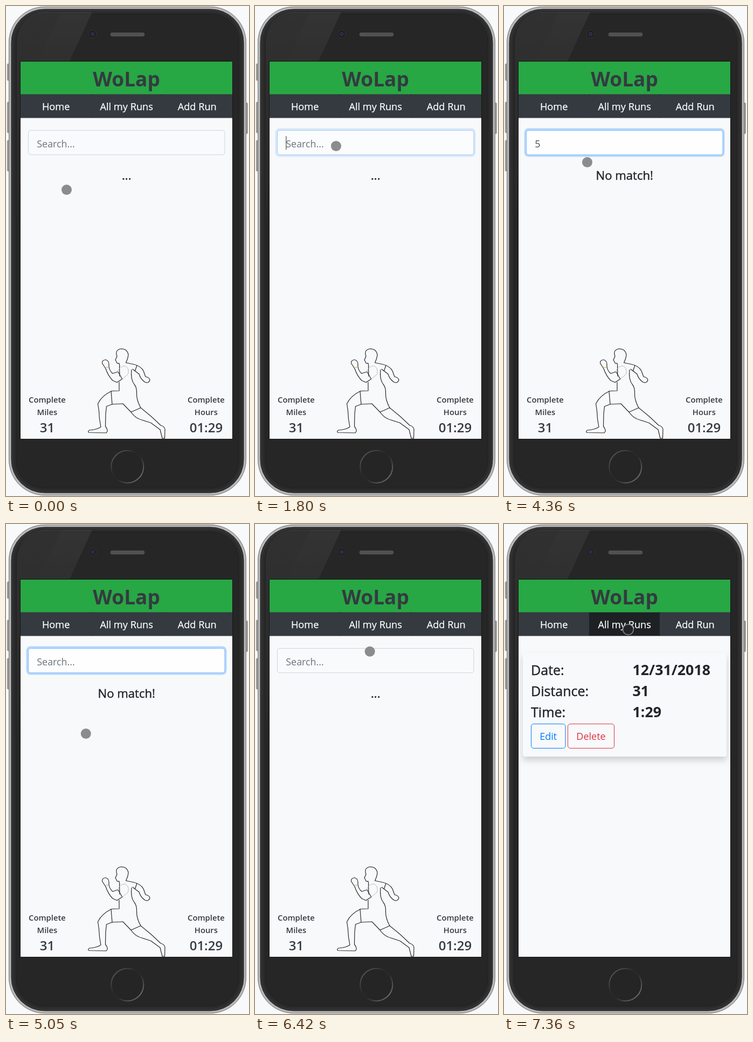
Write an HTML page that moves like this. It is 451 px wide and 908 px high and loops after 8 s.

```html
<!DOCTYPE html>
<html lang="en">
<head>
<meta charset="utf-8">
<title>Run tracker</title>
<style>
  html, body { margin: 0; width: 100%; height: 100%; overflow: hidden; background: #f8f9fb; }
  svg { display: block; width: 451px; height: 908px; }
  text { font-family: "Open Sans", "Noto Sans", sans-serif; fill: #212529; }
  .mid { text-anchor: middle; }
  .title { font-size: 37px; font-weight: 700; fill: #343a40; }
  .nav { font-size: 18.2px; fill: #fff; stroke: #fff; stroke-width: .25; }
  .field { font-size: 17.9px; }
  .result { font-size: 22.1px; stroke: #212529; stroke-width: .45; }
  .label { font-size: 14.8px; font-weight: 600; fill: #343a40; }
  .sum { font-size: 24px; font-weight: 600; fill: #343a40; }
  .row { font-size: 25px; stroke: #212529; stroke-width: .45; }
  .value { font-size: 26.8px; font-weight: 700; }
  .button { font-size: 18px; }
  .runner { fill: none; stroke: #26282a; stroke-width: 1.2; stroke-linejoin: round; stroke-linecap: round; }
</style>
</head>
<body>
<svg viewBox="0 0 451 908">
  <defs>
    <linearGradient id="shine" x1="0" y1="0" x2="0" y2="1">
      <stop offset="0" stop-color="#fff" stop-opacity=".05"/>
      <stop offset="1" stop-color="#fff" stop-opacity=".01"/>
    </linearGradient>
    <linearGradient id="ring" x1="0" y1="0" x2="1" y2="1">
      <stop offset="0" stop-color="#686868"/>
      <stop offset=".4" stop-color="#2a2a2a"/>
      <stop offset=".55" stop-color="#2a2a2a"/>
      <stop offset="1" stop-color="#8a8a8a"/>
    </linearGradient>
    <pattern id="mesh" width="3" height="3" patternUnits="userSpaceOnUse">
      <rect width="3" height="3" fill="#464646"/>
      <path d="M0 0h1v1H0zM1.5 1.5h1v1h-1z" fill="#777"/>
    </pattern>
    <filter id="shadow" x="-10%" y="-10%" width="120%" height="130%">
      <feDropShadow dx="0" dy="7" stdDeviation="6" flood-opacity=".17"/>
    </filter>
  </defs>

  <g id="shell"></g>
  <path d="M20 62Q25 18 68 11H160L118 102H27V300L20 400Z" fill="url(#shine)"/>
  <path d="M103 11H160L118 102H58Z" fill="url(#shine)" opacity=".3"/>
  <circle cx="160.7" cy="52" r="7" fill="#1d1c20" stroke="#353535"/>
  <circle cx="160.7" cy="52" r="3.2" fill="#28273c" stroke="#3c3b55"/>
  <rect x="194" y="49.5" width="63" height="6.5" rx="3.2" fill="url(#mesh)" stroke="#555" stroke-width=".7"/>
  <circle cx="225.3" cy="853.7" r="30" fill="#252525" stroke="url(#ring)" stroke-width="2"/>

  <!-- Screen -->
  <rect x="26" y="102" width="395" height="701" fill="#171717"/>
  <rect x="27" y="103" width="393" height="699" fill="#f8f9fb"/>
  <rect x="27" y="103" width="393" height="61" fill="#28a745"/>
  <text class="mid title" x="223.5" y="149">WoLap</text>
  <rect x="27" y="163.5" width="393" height="44" fill="#343a40"/>
  <rect id="active" x="158" y="164" width="131" height="43" fill="#1d2124"/>
  <g id="nav"></g>

  <g id="home">
    <rect x="41.5" y="230.5" width="364.5" height="45.2" rx="4.5" fill="#f9fafc" stroke="#ced4da"/>
    <g id="focus" stroke="#80bdff">
      <rect x="39.5" y="228.5" width="368" height="49" rx="6" fill="none" stroke="#007bff" stroke-width="4" stroke-opacity=".27"/>
      <rect x="41.5" y="230.5" width="364.5" height="45.2" rx="4.5" fill="#fefefe"/>
    </g>
    <text id="query" class="field" x="57.3" y="262"></text>
    <path id="caret" d="M0 241v25.5" stroke="#495057" stroke-width="1.2"/>
    <text id="result" class="mid result" x="223.7" y="322"></text>
    <g id="totals"></g>
    <g class="runner">
      <!-- Head, back arm, torso -->
      <path d="M211 668L210 662Q205 663 205 659L203 656L206 649Q202 638 212 635.5Q224 634 227 645Q227 652 222.5 661L237 664Q250 667 255 676L259 687Q266 688 267 693Q265 700 258 697Q250 692 247 682L235 673"/>
      <path d="M243 666L239.5 676M210.5 668L211 686M210 697V713L195 713.5L197 738L217 737L232 752.5L250 744.5Q242 730 242.5 718Q243 707 238 701Q231 692 233 674"/>
      <!-- Front arm -->
      <path d="M207 678L198 681Q192 676 191 668Q192 657 185 655.5Q178 656 178.5 662L185 672Q190 686 198 694L206 697.5L216 691M208 678L215 690"/>
      <path d="M207 678Q212 667 221 667Q230 672 226 683L216 691" stroke="#aaa" stroke-width=".9" stroke-dasharray="1.5 1"/>
      <path d="M185.5 669.5h4" stroke="#e4a743"/>
      <!-- Legs -->
      <path d="M195 714Q178 722 170.5 737Q173 750 173.5 765L176 780Q169 785 155 786Q151 788 154 790.5L186 791Q191 787 184.5 779L185 756L186.5 742L197 738"/>
      <path d="M232 752.5Q240 764 252 767L269 772.5L286 785L290 801H294.5L295 784Q294 779 287 777L270 761L250 744.5"/>
    </g>
  </g>

  <g id="runs">
    <rect x="35" y="238" width="378" height="193" rx="4.5" fill="#f8f9fb" filter="url(#shadow)"/>
    <g id="card"></g>
  </g>

  <circle id="pointer" stroke-width="1.5"/>
</svg>
<script>
  const LOOP = 8000;
  const BLINK = 530;
  // Moments of the story, in ms
  const PRESS = 1660, FOCUS = 1800, TYPE = 2600, SEARCH = 2750, ERASE = 4500, BLUR = 5570;
  const TAP = 7060, OPEN = 7210, HIGHLIGHT = 7360;

  const el = id => document.getElementById(id);
  const show = (id, on) => { el(id).style.display = on ? "" : "none"; };

  function add(parent, tag, attrs, text = "") {
    const node = document.createElementNS("http://www.w3.org/2000/svg", tag);
    set(node, attrs);
    node.textContent = text;
    el(parent).append(node);
  }
  function set(node, attrs) {
    for (const name in attrs) node.setAttribute(name, attrs[name]);
  }
  const write = (parent, style, x, y, text, fill) =>
    add(parent, "text", { class: style, x, y, style: fill ? `fill:${fill}` : "" }, text);

  function build() {
    const key = (x, y, height) =>
      add("shell", "rect", { x, y, width: 5, height, rx: 1.5, fill: "#9a9a9a", stroke: "#777", "stroke-width": .6 });
    key(2.3, 107, 31);
    key(2.3, 178, 57);
    key(2.3, 249, 57);
    key(443.5, 179.5, 57);

    const layer = (inset, fill, stroke) => add("shell", "rect", {
      x: 5.5 + inset, y: 1.5 + inset, width: 440 - 2 * inset, height: 905 - 2 * inset,
      rx: 66 - inset, fill, stroke
    });
    layer(0, "#b7b7b7", "#747474");
    layer(4.5, "#343434", "#1d1d1d");
    layer(8, "#2b2b2b", "none");
    layer(13, "#262626", "#202020");

    ["Home", "All my Runs", "Add Run"].forEach((name, i) => {
      write("nav", "mid nav", 92.7 + 131 * i, 192.5, name);
      if (i) add("nav", "path", { d: `M${27.5 + 131 * i} 164v1.5m0 40v1.5`, stroke: "#17191c" });
    });

    [["Miles", "31"], ["Hours", "01:29"]].forEach(([unit, sum], i) => {
      const x = 76.4 + 295 * i;
      write("totals", "mid label", x, 735, "Complete");
      write("totals", "mid label", x, 758, unit);
      write("totals", "mid sum", x, 789.5, sum);
    });

    [["Date:", "12/31/2018"], ["Distance:", "31"], ["Time:", "1:29"]].forEach(([name, value], i) => {
      write("card", "row", 50, 280 + 39 * i, name);
      write("card", "value", 238.5, 280 + 39 * i, value);
    });
    const button = (x, width, name, color) => {
      add("card", "rect", { x, y: 370.5, width, height: 45, rx: 4.5, fill: "none", stroke: color });
      write("card", "mid button", x + width / 2, 400, name, color);
    };
    button(50.5, 63.5, "Edit", "#007bff");
    button(118.5, 86, "Delete", "#dc3545");
  }

  const stepped = (t, from, to, steps) =>
    Math.min(1, Math.max(0, Math.floor((t - from) / (to - from) * steps) / steps));
  const ease = p => p < .5 ? 4 * p ** 3 : 1 - 4 * (1 - p) ** 3;

  const START = { x: 112.5, y: 340.5 };
  const MOVES = [
    { from: 130, to: 730, steps: 5, x: 150.5, y: 259.5 },
    { from: 3380, to: 4360, steps: 8, x: 154.5, y: 289.5 },
    { from: 4360, to: 5050, steps: 5, x: 148.3, y: 388.5 },
    { from: 5820, to: 6780, steps: 8, x: 230.5, y: 195.5 }
  ];

  function pointerAt(t) {
    return MOVES.reduce((p, move) => {
      const k = ease(stepped(t, move.from, move.to, move.steps));
      return { x: p.x + (move.x - p.x) * k, y: p.y + (move.y - p.y) * k };
    }, START);
  }

  function drawPointer(t) {
    const { x, y } = pointerAt(t);
    const pressed = (t >= PRESS && t < FOCUS) || t >= TAP;
    set(el("pointer"), {
      cx: x, cy: y, r: pressed ? 9.8 : 9.5,
      fill: pressed ? "#222528" : "#8c8c8c",
      stroke: !pressed ? "none" : t < OPEN ? "#f4f4f4" : "#8b8d8f"
    });
  }

  function drawSearch(t) {
    const typed = t >= TYPE && t < ERASE;
    el("query").textContent = typed ? "5" : "Search...";
    el("query").style.fill = typed ? "#495057" : "#6c757d";
    el("result").textContent = t >= SEARCH && t < BLUR ? "No match!" : "...";

    const fadeIn = stepped(t, FOCUS - 130, FOCUS + 130, 2);
    const fadeOut = stepped(t, BLUR - 120, BLUR + 120, 2);
    set(el("focus"), { opacity: fadeIn - fadeOut });

    // The caret restarts its blink at each input.
    const lastInput = [FOCUS, TYPE, ERASE].findLast(time => time <= t);
    show("caret", t < BLUR - 20 && (t - lastInput) % (2 * BLINK) < BLINK);
    set(el("caret"), { transform: `translate(${typed ? 68.2 : 57.8} 0)` });
  }

  function draw(t) {
    drawPointer(t);
    drawSearch(t);
    show("home", t < OPEN);
    show("runs", t >= OPEN);
    show("active", t >= HIGHLIGHT);
  }

  let start;
  function tick(now) {
    start ??= now;
    draw((now - start) % LOOP);
    requestAnimationFrame(tick);
  }
  build();
  draw(0);
  requestAnimationFrame(tick);
</script>
</body>
</html>
```
